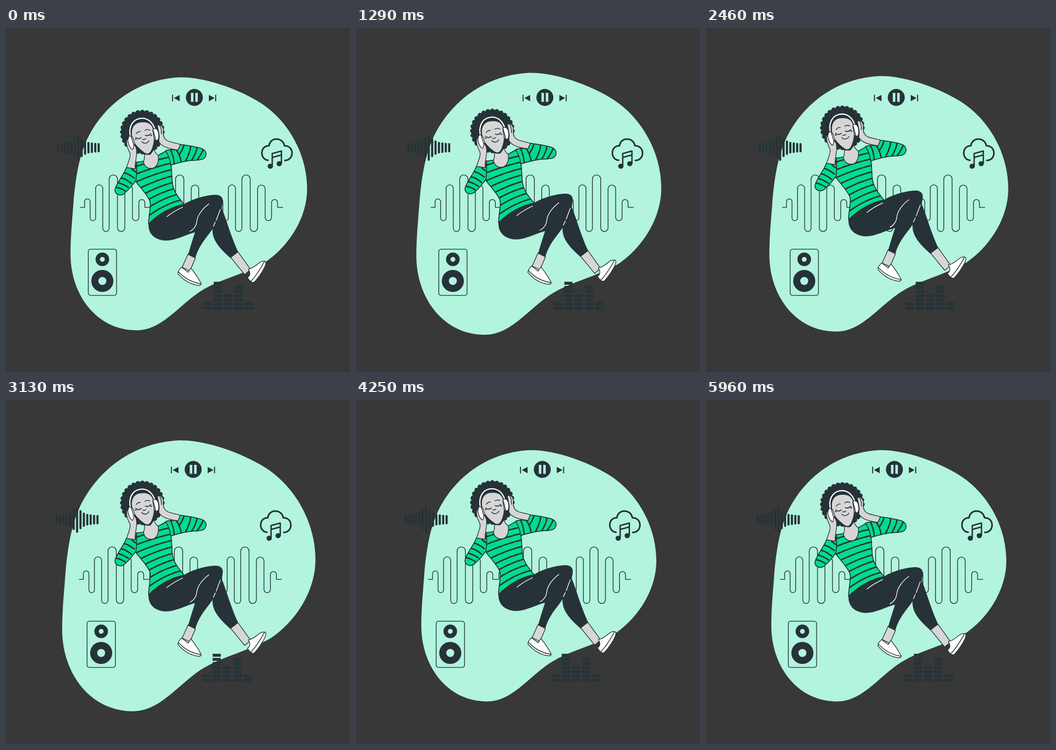
Write an HTML page that moves like this. It is 748 px wide and 748 px high and loops after 6 s.

```html
<!DOCTYPE html>
<html lang="en">
<head>
<meta charset="utf-8">
<title>Music</title>
<style>
html, body { margin: 0; width: 100%; height: 100%; overflow: hidden; background: #383838; }
svg { display: block; width: 748px; height: 748px; }
.dark { fill: #263238; }
.mint { fill: #b2f4de; }
.line { fill: none; stroke: #263238; stroke-width: 1.6; stroke-linecap: round; stroke-linejoin: round; }
.skin { fill: #d6d6d6; }
.shirt { fill: #00dc8d; }
.white { fill: #fff; }
.edge { stroke: #263238; stroke-width: 1.5; stroke-linejoin: round; }
.stripe { fill: none; stroke: #263238; stroke-width: 3; }
.seam { fill: none; stroke: #fff; stroke-width: 1.5; stroke-linecap: round; }
</style>
</head>
<body>
<svg viewBox="0 0 748 748">
  <defs>
    <clipPath id="torsoClip"><path id="torso" d="M279 293 C286 292 294 292 300 290 C300 301 308 307 317 306 C328 305 333 293 330 278 C337 275 343 271 348 268 L357 286 C361 305 360 325 362 340 C365 358 376 370 387 384 C360 389 331 405 310 427 C310 408 316 390 313 377 C306 361 291 347 281 333Z"/></clipPath>
    <clipPath id="leftClip"><path id="leftSleeve" d="M262 304 L281 307 L284 294 C284 308 284 320 283 331 C277 341 266 353 257 361 C251 366 239 365 237 355 C236 344 255 322 262 304Z"/></clipPath>
    <clipPath id="rightClip"><path id="rightSleeve" d="M347 268 C356 263 366 266 374 266 L379 254 C394 256 414 259 426 263 C435 267 438 276 432 283 C427 289 411 288 400 289 C385 291 371 295 358 299 C357 288 353 277 347 268Z"/></clipPath>
  </defs>

  <path id="blob" class="mint" d="M378 109 C428 108 497 131 547 161 C612 200 653 275 653 350 C653 415 611 476 563 508 C510 538 462 545 420 573 C372 606 338 655.500 285 655.500 C198 655.500 142 578 142 491 C142 455 145 425 148 385 C152 330 160 283 176 247 C206 180 275 114 378 109Z"/>

  <g id="icons">
    <path id="wave" class="line"/>
    <circle class="dark" cx="409.700" cy="151" r="18.500"/>
    <path class="mint" d="M402.200 141h5.500v19.500h-5.500z M411.700 141h5.500v19.500h-5.500z"/>
    <path class="dark" d="M361.200 145h2.200v14.500h-2.200z M365.200 152.200L377.700 145.500V159.200z M441.200 145.500L453.700 152.200L441.200 159.200z M455 145h2.200v14.500h-2.200z"/>
    <g id="bars" class="dark"></g>
    <g id="levels" class="dark"></g>
    <path class="line" style="stroke-width:3.500" d="M570 287.500 C562 287 556.500 280 556.500 272 C556.500 262 563 256 572 256 C573 247 580 241.500 588 241.500 C597 241.500 604 247 605.500 256 C615 256 622 262 622 272 C622 281 616 287.500 606.500 288"/>
    <path class="line" style="stroke-width:3" d="M579 300V273L599 267.500V294 M579 281.500L599 276"/>
    <ellipse class="dark" cx="574.800" cy="300.500" rx="5.700" ry="5.500"/>
    <ellipse class="dark" cx="594.300" cy="295" rx="5.700" ry="5.500"/>
    <rect class="line" x="179" y="481" width="61.500" height="100.500" rx="5"/>
    <circle class="dark" cx="209.600" cy="503" r="14.800"/><circle class="mint" cx="209.600" cy="503" r="5.300"/>
    <circle class="dark" cx="209.600" cy="550" r="24"/><circle class="mint" cx="209.600" cy="550" r="8.700"/>
  </g>

  <g id="woman">
    <!-- legs -->
    <path class="skin edge" d="M488 499L504 487L532 526L519 537Z"/>
    <path class="white edge" d="M527 525 C536 524 545 516 551 511 C557 507 566 506 565 512 C565 521 548 545 540 553 C535 557 528 549 525 543 C531 540 532 533 527 525Z"/>
    <path class="line" d="M532 552 C541 543 554 523 562 508.500"/>
    <path class="skin edge" d="M396 492L412 501L400 529L383 521Z"/>
    <path class="white edge" d="M382 521 C378 524 373 531 374 535 C385 548 400 558 418 560.500 C424 560.500 426 558 423 554 C416 541 409 531 402 523 L396 532Z"/>
    <path class="line" d="M375 531 C387 544 403 554 424 557"/>
    <path class="dark" d="M455 366 L471 382 C470 388 468 392 471 397 C480 420 490 456 505 488 L488 501 C473 487 454 470 450 450 C448 440 450 432 450 422Z"/>
    <path class="dark" d="M310 426 C330 405 360 389 387 384 C405 372 438 363 457 363.500 C469 364 473 372 471 381 C469 393 456 420 449 438 C436 457 420 472 411.500 501.500 L396 494 C401 476 406 460 411 445 C390 450 370 463 347 463 C322 462 308 446 310 426Z"/>
    <path class="seam" d="M350 411 C360 403 372 396 384 390.500 M441 383.500 C428 393 417 407 415 420 Q414 429 411 433 C408 438 404 441 400 443 M466 395L457 419 M455 423L451 432"/>

    <!-- shirt -->
    <use href="#torso" class="shirt edge"/>
    <path id="torsoStripes" class="stripe" clip-path="url(#torsoClip)"/>
    <use href="#torso" class="line"/>
    <use href="#rightSleeve" class="shirt edge"/>
    <path class="stripe" clip-path="url(#rightClip)" d="M357 264 Q365 279 366 299 M369 264 Q379 277 381 294 M388 252 Q385 265 377 276 M402 256 Q400 273 390 291 M416 257 Q414 274 402 291 M430 262 Q425 276 413 291"/>
    <use href="#rightSleeve" class="line"/>
    <use href="#leftSleeve" class="shirt edge"/>
    <path class="stripe" clip-path="url(#leftClip)" d="M255 315 Q266 317 280 328 M247 326 Q260 328 274 340 M239 336 Q252 338 267 348 M236 347 Q247 347 260 356 M273 307 Q279 313 285 315"/>
    <use href="#leftSleeve" class="line"/>

    <!-- head -->
    <g id="hair" class="dark"></g>
    <path class="skin edge" d="M300 268 C302 278 302 284 299 291 C300 301 308 307 317 306 C328 305 333 293 331 278 C327 275 323 271 321 263Z"/>
    <path class="dark" d="M284 250 L326 245 C327 258 321 268 314 276 C305 278 292 274 284 268Z"/>
    <path class="skin" d="M274 234 C272 216 281 206 296 206 C311 205 318 212 320 223 C323 240 322 252 316 266 C312 275 306 276 299 270 C288 262 276 250 274 234Z"/>
    <path class="line" d="M283 231 Q286 226 292 226 M302 223.500 Q307 220 313 223 M297 242.500 Q299 245 304 241.500 M295 248 Q303 256 311 246"/>
    <path class="line" style="stroke-width:2" d="M282 239 Q288 244 294 239 M303 234 Q309 237 315 231 M283 243L281 242.500 M315 235L317 234"/>
    <path class="seam" style="stroke-width:2.600" d="M271 239 C265 217 275 200 291 197.500 C307 195 319 205 324 222"/>
    <path class="white edge" d="M267 237 C272 233 276 238 278 246 C281 255 282 263 277 265 C269 266 264 251 265 243Z"/>
    <path class="line" d="M272 236 L280 263"/>
    <path class="white edge" d="M319 222 C323 217 329 219 331 227 C333 236 333 242 329 245 C324 246 322 243 322 239Z"/>
    <path class="line" d="M320 223 L326 245"/>

    <!-- hands -->
    <path class="skin edge" d="M265 240 C260 246 262 258 269 272 C272 279 267 290 262 304 L281 307 C279 296 285 282 284 268 C284 262 281 257 278 254 C277 259 278 264 275 265 C269 262 264 250 265 240Z"/>
    <path class="skin edge" d="M329 213 C337 208 343 217 342 227 C341 238 346 244 353 247 C361 250 371 251 379 254 L374 266 C357 264 339 259 333 249 C331 246 334 240 333 234 C332 226 330 219 329 213Z"/>
    <path class="line" d="M333 211 C338 217 338 224 338 231"/>
  </g>
</svg>
<script>
const $ = id => document.getElementById(id);
const LOOP = 6000, FPS = 24;

// Waveform: three equal cells of rounded peaks and dips
const sides = [171, 183, 195, 210.5, 224.5, 242.5, 258.5, 275, 289, 302];
const ends = [371.5, 419, 341, 442.5, 319.5, 442.5, 341.5, 419, 373];
const CELL = 144.3, MID = 390;
let wave = `M162 ${MID}`;
for (let c = 0; c < 3; c++) {
  wave += `H${sides[0] + c * CELL}`;
  ends.forEach((end, i) => {
    const a = sides[i] + c * CELL, b = sides[i + 1] + c * CELL;
    const r = (b - a) / 2, up = i % 2 === 0;
    const y = up ? end + r : end - r;
    wave += `V${y}A${r} ${r} 0 0 ${up ? 1 : 0} ${b} ${y}`;
  });
  wave += `V${MID}`;
}
$('wave').setAttribute('d', wave + 'H602');

const rect = (x, y, w, h, r = 0) =>
  `<rect x="${x}" y="${y}" width="${w}" height="${h}" rx="${r}"/>`;

$('bars').innerHTML = [9, 10, 11.5, 13, 16, 22.5, 28.5, 20.5, 15.5, 12.5, 11.5, 10.5, 10]
  .map((h, i) => rect(110.5 + i * 7.4, 260.3 - h, 4.6, h * 2, 2)).join('');

$('levels').innerHTML = [2, 7, 4, 6, 2].map((n, col) =>
  Array.from({ length: n }, (_, row) =>
    rect(429.6 + col * 22.4, 605.8 - row * 9, 17.7, 6.4)).join('')).join('');

// Shirt stripes grow steeper and more bowed towards the hem
let stripes = '';
for (let i = 0; i < 8; i++) {
  const x1 = 270 + i * 5, y1 = 306 + i * 15.3;
  const x2 = 365 + i * 3, y2 = 279 + i * 13.5;
  stripes += `M${x1} ${y1}Q${(x1 + x2) / 2} ${(y1 + y2) / 2 - 3 - i * 1.2} ${x2} ${y2}`;
}
$('torsoStripes').setAttribute('d', stripes);

let hair = '<circle cx="296.500" cy="227" r="45"/>';
for (let i = 0; i < 28; i++) {
  const a = i / 28 * Math.PI * 2;
  hair += `<circle cx="${296.5 + 43.3 * Math.cos(a)}" cy="${227 + 43.3 * Math.sin(a)}" r="5.2"/>`;
}
$('hair').innerHTML = hair;

// Linear interpolation over [time, value] steps
function track(steps, t) {
  const i = steps.findIndex(s => s[0] >= t);
  if (i < 1) return steps[i < 0 ? steps.length - 1 : 0][1];
  const [t0, a] = steps[i - 1], [t1, b] = steps[i];
  return a + (b - a) * (t - t0) / (t1 - t0);
}
const beat = [[0, 1], [625, 1.1], [1850, 1], [2400, 1], [3000, 1.1], [3750, 1], [LOOP, 1]];
const shake = [0, -1.5, 3, -6, 6, -6, 6, -6, 3, -1.5, 0].map((x, i) => [i * 600, x]);
const float = [[0, 0], [750, -15], [1500, 0]];

const start = performance.now();
function draw(now) {
  const elapsed = Math.max(0, now - start) % LOOP;
  const step = Math.floor((elapsed + 4) * FPS / 1000) % (LOOP * FPS / 1000);
  const t = (step + 1) * 1000 / FPS;
  const s = track(beat, t);
  $('blob').setAttribute('transform', `translate(397.5 382) scale(${s}) translate(-397.5 -382)`);
  $('icons').setAttribute('transform', `translate(${track(shake, t)} 0)`);
  $('woman').setAttribute('transform', `translate(0 ${track(float, t % 1500)})`);
  requestAnimationFrame(draw);
}
draw(start);
</script>
</body>
</html>
```
